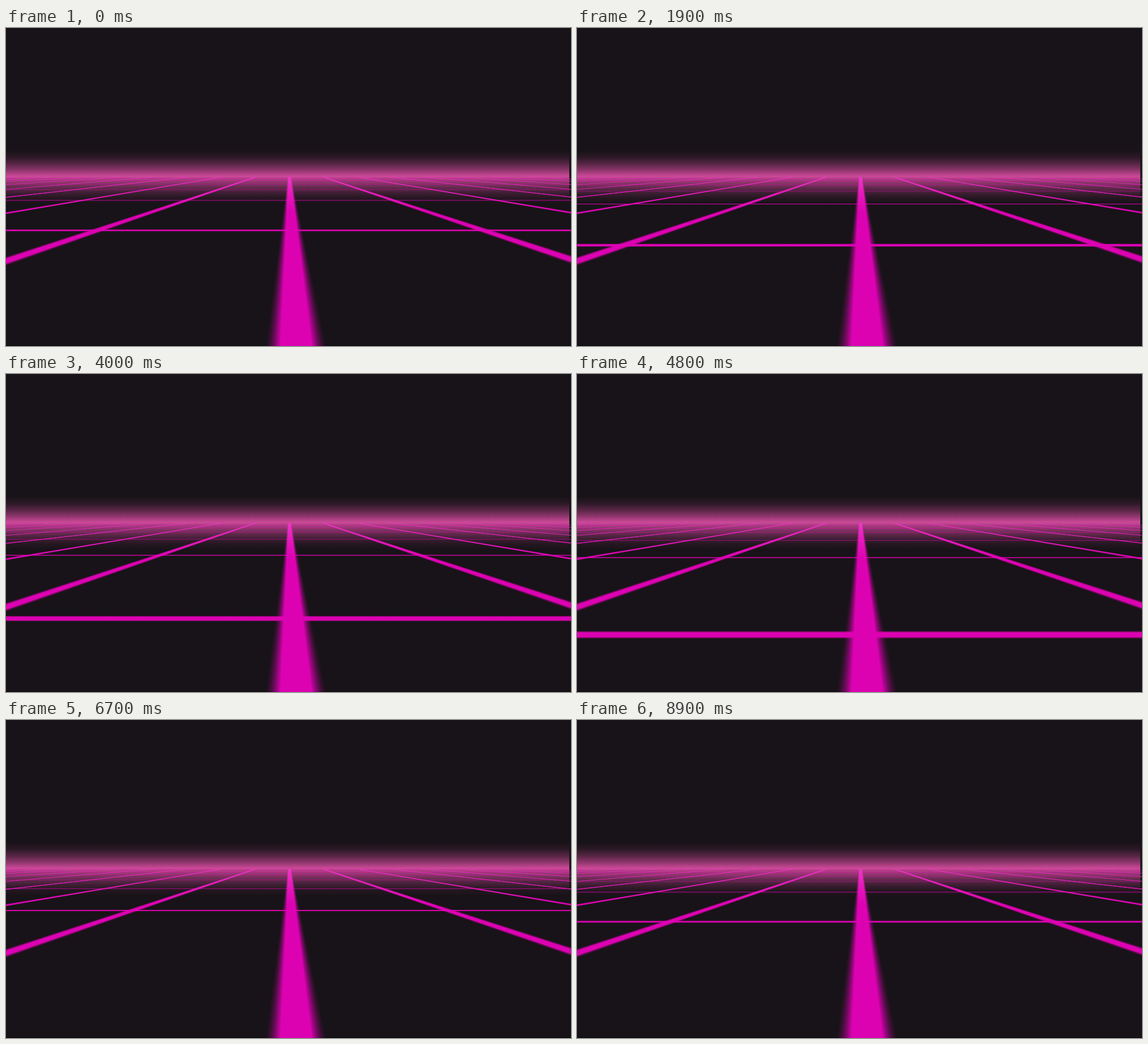
An HTML page with a canvas that plays this animation: 998x561 px, repeating every 9 s.

```html
<!DOCTYPE html>
<html lang="en">
<head>
<meta charset="utf-8">
<title>Neon grid</title>
<style>
  html, body { margin: 0; width: 100%; height: 100%; overflow: hidden; background: #181318; }
  canvas { display: block; width: 100vw; height: 100vh; }
</style>
</head>
<body>
<canvas id="stage" width="998" height="561"></canvas>
<script>
const W = 998, H = 561, LOOP = 9000, STEP = 100;
const HORIZON = 263;
const VANISH = { x: 500, y: 243 };
const SPACING = 2.997;   // sideways run per pixel of depth between rails
const PINK = '220, 2, 178';

const ctx = document.getElementById('stage').getContext('2d');

function verticalGradient(g, y0, y1, stops) {
  const fill = g.createLinearGradient(0, y0, 0, y1);
  for (const [y, color] of stops) fill.addColorStop((y - y0) / (y1 - y0), color);
  return fill;
}

function paintGlow(g) {
  const glow = a => `rgba(208, 74, 155, ${a})`;
  g.fillStyle = verticalGradient(g, 216, 310, [
    [216, glow(0)], [228, glow(0.11)], [240, glow(0.35)], [251, glow(0.64)],
    [259, glow(0.9)], [262, glow(0.98)], [265, glow(0.86)], [272, glow(0.66)],
    [282, glow(0.4)], [292, glow(0.19)], [301, glow(0.06)], [310, glow(0)]
  ]);
  g.fillRect(0, 216, 995, 94);
}

// A rail is a wedge from the vanishing point, built from nested layers for soft sides.
function paintRail(g, slope, soft, core, layers) {
  const y0 = HORIZON, y1 = y0 + 340;
  const at = (k, y) => VANISH.x + k * (y - VANISH.y);
  let covered = 0;
  for (let i = 1; i <= layers; i++) {
    const p = i / layers;
    const target = Math.pow(p, 1.5);
    const left = slope + soft[0] + (core[0] - soft[0]) * p;
    const right = slope + soft[1] + (core[1] - soft[1]) * p;
    g.globalAlpha = Math.min(1, (target - covered) / (1 - covered));
    covered = target;
    g.beginPath();
    g.moveTo(at(left, y0), y0);
    g.lineTo(at(right, y0), y0);
    g.lineTo(at(right, y1), y1);
    g.lineTo(at(left, y1), y1);
    g.fill();
  }
  g.globalAlpha = 1;
}

function paintRails(g) {
  g.fillStyle = verticalGradient(g, HORIZON, 325, [
    [HORIZON, 'rgb(240, 56, 200)'], [290, 'rgb(230, 28, 188)'], [325, `rgb(${PINK})`]
  ]);
  for (let n = 1; n <= 8; n++) {
    for (const side of [-1, 1]) {
      paintRail(g, side * n * SPACING + 0.021, [-0.155, 0.155], [-0.075, 0.075], 8);
    }
  }
  paintRail(g, 0, [-0.138, 0.214], [-0.05, 0.128], 16);
}

function layer(paint) {
  const c = document.createElement('canvas');
  c.width = W;
  c.height = H;
  paint(c.getContext('2d'));
  return c;
}

const backdrop = layer(g => {
  g.fillStyle = '#181318';
  g.fillRect(0, 0, W, H);
  g.fillStyle = '#080609';
  g.fillRect(0, H - 1, W, 1);
  paintGlow(g);
});
const rails = layer(paintRails);

function paintBar(y, thick) {
  if (thick < 3) {
    ctx.fillStyle = `rgb(${PINK})`;
    ctx.fillRect(0, y - thick / 2, W, thick);
    return;
  }
  const outer = thick * 0.62, inner = thick * 0.34;
  ctx.fillStyle = verticalGradient(ctx, y - outer, y + outer, [
    [y - outer, `rgba(${PINK}, 0)`], [y - inner, `rgb(${PINK})`],
    [y + inner, `rgb(${PINK})`], [y + outer, `rgba(${PINK}, 0)`]
  ]);
  ctx.fillRect(0, y - outer, W, outer * 2);
}

// Bars approach at constant speed, so 1 / depth falls linearly with time.
function paintBars(phase) {
  for (let n = 6; n >= 0; n--) {
    const inverse = 0.008929 + 0.00802 * (n - phase);
    if (inverse < 0.0029) continue;
    const depth = 1 / inverse;
    const y = 245 + depth;
    if (y > HORIZON + 1) paintBar(y, Math.max(0.45, 0.00024 * depth * depth));
  }
}

function draw(now) {
  const t = Math.floor((now % LOOP) / STEP) * STEP;
  ctx.drawImage(backdrop, 0, 0);
  paintBars(t / LOOP);
  ctx.drawImage(rails, 0, 0);
}

let start = null;
function tick(now) {
  if (start === null) start = now;
  draw(Math.max(0, now - start));
  requestAnimationFrame(tick);
}
draw(0);
requestAnimationFrame(tick);
</script>
</body>
</html>
```
